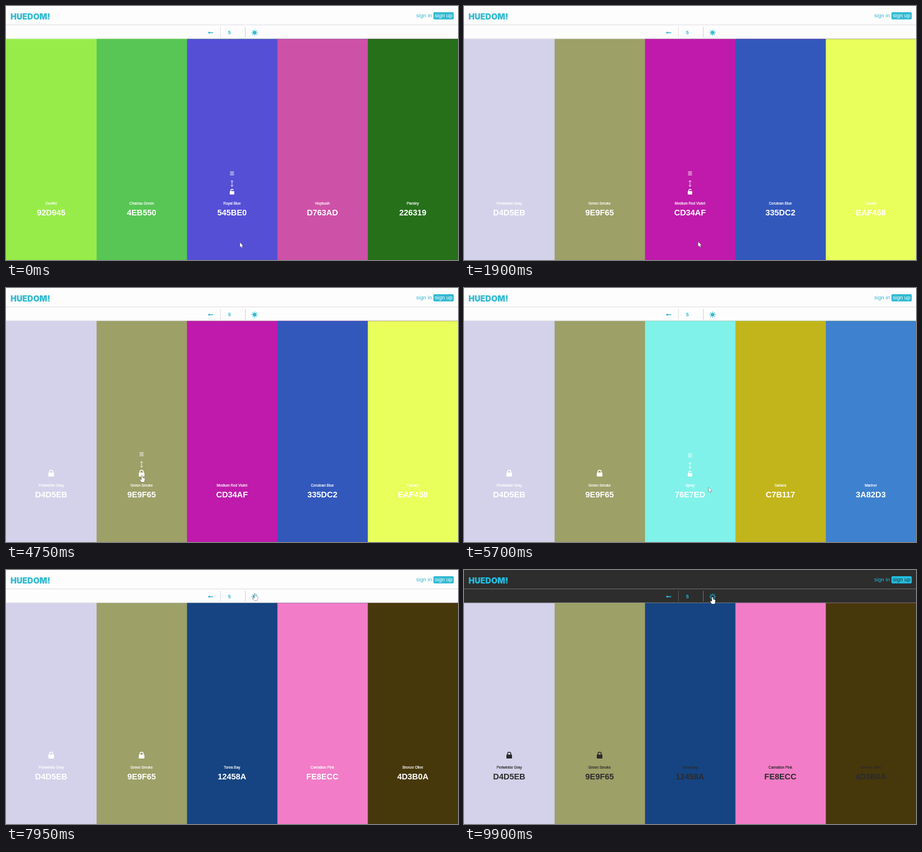
These frames come from a looping animation (800 px wide and 450 px high, 9950 ms). An HTML page with a canvas:

```html
<!DOCTYPE html>
<html lang="en">
<head>
<meta charset="utf-8">
<title>Palette</title>
<style>
html, body { margin: 0; width: 100%; height: 100%; overflow: hidden; background: #fff; }
canvas { display: block; width: 800px; height: 450px; }
</style>
</head>
<body>
<canvas id="stage" width="800" height="450"></canvas>
<script>
const ctx = document.getElementById('stage').getContext('2d');
const LOOP = 9950;
const DARK_AT = 8000;
const SANS = '"Liberation Sans", Arial, sans-serif';

// Swatch: [name, label, fill]
const periwinkle = ['Periwinkle Gray', 'D4D5EB', '#d4d2ea'];
const smoke = ['Green Smoke', '9E9F65', '#9da067'];
const palettes = [
  { from: 0, swatches: [
    ['Conifer', '92D945', '#98ec4a'], ['Chateau Green', '4EB550', '#57c654'],
    ['Royal Blue', '545BE0', '#554fd6'], ['Hopbush', 'D763AD', '#ce51a8'],
    ['Parsley', '226319', '#26701a']] },
  { from: 350, swatches: [periwinkle, smoke,
    ['Medium Red Violet', 'CD34AF', '#bf1aab'], ['Cerulean Blue', '335DC2', '#3358bc'],
    ['Canary', 'EAF458', '#e9ff5c']] },
  { from: 5650, swatches: [periwinkle, smoke,
    ['Spray', '76E7ED', '#80f2ea'], ['Sahara', 'C7B117', '#c2b51b'],
    ['Mariner', '3A82D3', '#3e81cf']] },
  { from: 7100, swatches: [periwinkle, smoke,
    ['Torea Bay', '12458A', '#164482'], ['Carnation Pink', 'FE8ECC', '#f27cc7'],
    ['Bronze Olive', '4D3B0A', '#47380c']] }
];
const lockTimes = [3400, 4500];

const themes = {
  light: { accent: '#31bad2', back: '#fdfdfd', rule: '#dedee2', divider: '#cdd0d6', ink: '#fff' },
  dark: { accent: '#20bee0', back: '#2d2d2d', rule: '#707070', divider: '#707070', ink: '#2b2b2b' }
};

// Cursor tip: [time, x, y]
const path = [
  [0, 414, 419], [700, 414.5, 418], [2300, 414.5, 418], [3100, 70.5, 334.5],
  [3300, 79, 331], [3600, 79, 331], [4250, 241, 332], [4850, 241, 332],
  [5500, 433, 353], [7200, 433, 353], [7800, 441, 42], [8300, 441, 42],
  [8700, 440, 48], [LOOP, 440, 48]
];

function cursorAt(t) {
  const i = Math.max(1, path.findIndex(p => p[0] > t));
  const [t0, x0, y0] = path[i - 1], [t1, x1, y1] = path[i];
  const k = (t - t0) / (t1 - t0), e = k * k * (3 - 2 * k);
  return { x: x0 + (x1 - x0) * e, y: y0 + (y1 - y0) * e };
}

function text(str, x, y, font, color, align = 'left', weight = 0) {
  ctx.font = font;
  ctx.fillStyle = ctx.strokeStyle = color;
  ctx.textAlign = align;
  ctx.fillText(str, x, y);
  if (weight) {
    ctx.lineWidth = weight;
    ctx.strokeText(str, x, y);
  }
}

function rect(x, y, w, h, color) {
  ctx.fillStyle = color;
  ctx.fillRect(x, y, w, h);
}

function line(points, color, width = 1) {
  ctx.strokeStyle = color;
  ctx.lineWidth = width;
  ctx.beginPath();
  points.forEach(([x, y]) => ctx.lineTo(x, y));
  ctx.stroke();
}

function roundBox(x, y, w, h, r, color) {
  ctx.fillStyle = color;
  ctx.beginPath();
  ctx.roundRect(x, y, w, h, r);
  ctx.fill();
}

function lock(x, y, color, open) {
  const w = open ? 8 : 10, r = open ? 2.1 : 2.9;
  roundBox(x - w / 2, y - 1, w, open ? 6 : 7, 1, color);
  ctx.strokeStyle = color;
  ctx.lineWidth = 1.5;
  ctx.beginPath();
  if (!open) ctx.moveTo(x + r, y - 1);
  ctx.arc(x, y - 2.3, r, open ? -0.2 : 0, Math.PI, true);
  ctx.lineTo(x - r, y - 1);
  ctx.stroke();
}

function hoverIcons(x, dy, color) {
  ctx.globalAlpha = 0.85;
  for (let i = 0; i < 4; i++) rect(x - 3.5, 293 + dy + i * 2, 7, 0.9, color);
  line([[x, 309.5 + dy], [x, 319.5 + dy]], color);
  for (const [tip, dir] of [[309, 1], [320, -1]]) {
    const y = tip + dy;
    line([[x - 2.3, y + dir * 2.5], [x, y], [x + 2.3, y + dir * 2.5]], color);
  }
  ctx.globalAlpha = 1;
}

function sun(x, y, color, outlined) {
  ctx.fillStyle = ctx.strokeStyle = color;
  ctx.lineWidth = 1;
  ctx.beginPath();
  ctx.arc(x, y, 3.3, 0, 7);
  outlined ? ctx.stroke() : ctx.fill();
  for (let i = 0; i < 8; i++) {
    const c = Math.cos(i * Math.PI / 4), s = Math.sin(i * Math.PI / 4);
    line([[x + c * 4, y + s * 4], [x + c * 5.5, y + s * 5.5]], color, 1.3);
  }
}

function shape(x, y, points) {
  ctx.beginPath();
  points.forEach(([px, py]) => ctx.lineTo(x + px, y + py));
  ctx.closePath();
  ctx.lineJoin = 'round';
  ctx.lineWidth = 0.8;
  ctx.strokeStyle = '#333';
  ctx.fillStyle = '#fff';
  ctx.stroke();
  ctx.fill();
  ctx.lineJoin = 'miter';
}

const arrow = [[0, 0], [0, 8], [1.8, 6.4], [3.1, 9.3], [4.4, 8.7], [3.2, 5.9], [5.6, 5.8]];
const hand = [[-1, 0], [0.4, 0], [0.7, 4], [4, 4.8], [4.8, 5.8], [4.4, 9.2], [3.4, 12],
  [-1.3, 12], [-4, 8], [-3.6, 6.8], [-1.3, 8]];

function header(theme) {
  const { accent, back, rule, divider } = theme;
  rect(0, 0, 800, 59, back);
  rect(0, 33, 800, 1, rule);
  rect(0, 57.5, 800, 1, rule);
  text('HUEDOM!', 8, 24, '900 14.3px Inter, sans-serif', accent);
  text('sign in', 726, 20.3, '9.6px ' + SANS, accent);
  roundBox(756.5, 11, 36, 12.7, 2, accent);
  text('sign up', 774.5, 20.3, '9.6px ' + SANS, back, 'center');

  line([[359, 47.3], [366.5, 47.3]], accent, 1.6);
  ctx.fillStyle = accent;
  ctx.beginPath();
  ctx.moveTo(357, 47.3);
  ctx.lineTo(360.5, 45);
  ctx.lineTo(360.5, 49.6);
  ctx.fill();

  ctx.setLineDash([2, 1]);
  line([[379.5, 37], [379.5, 56]], divider);
  ctx.setLineDash([]);
  line([[423.5, 37], [423.5, 56]], divider);
  text('5', 395.5, 50, 'bold 8.8px ' + SANS, accent, 'center');
  sun(440, 47.3, accent, theme === themes.dark);
}

function draw(t) {
  const theme = t < DARK_AT ? themes.light : themes.dark;
  const { swatches } = palettes.filter(p => t >= p.from).pop();
  const tip = cursorAt(t);
  const hovered = tip.y > 58 ? Math.floor(tip.x / 160) : -1;

  header(theme);
  // Each fill runs to the right edge, so neighbours blend on the shared pixel.
  swatches.forEach(([, , fill], i) => {
    const left = i ? i * 160 + 0.4 : 0;
    rect(left, 58.4, 800 - left, 392, fill);
  });
  swatches.forEach(([name, label], i) => {
    const x = i * 160 + 80, locked = t >= lockTimes[i];
    if (hovered === i) hoverIcons(x, locked ? -2 : 0, theme.ink);
    if (locked || hovered === i) lock(x, locked ? 328 : 329, theme.ink, !locked);
    text(name, x, 352.2, '6.4px ' + SANS, theme.ink, 'center', 0.2);
    text(label, x, 371, 'bold 14.4px ' + SANS, theme.ink, 'center');
  });

  const overLock = hovered >= 0 && Math.hypot(tip.x - hovered * 160 - 80, tip.y - 329) < 6;
  const overSun = Math.hypot(tip.x - 440, tip.y - 47) < 10;
  shape(tip.x, tip.y, overLock || overSun ? hand : arrow);
}

const start = performance.now();
function frame() {
  draw((performance.now() - start) % LOOP);
  requestAnimationFrame(frame);
}
frame();
</script>
</body>
</html>
```
